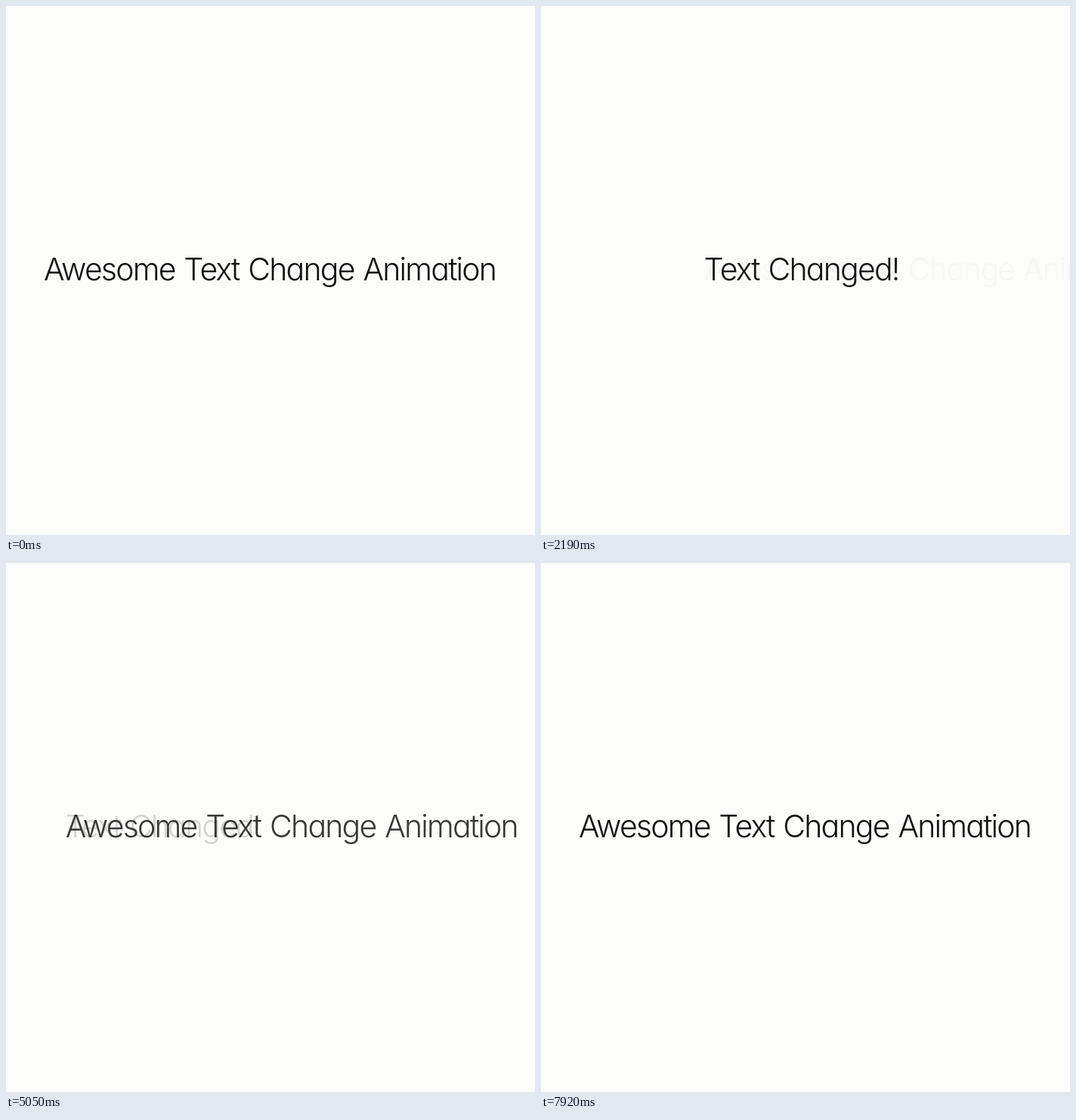
An HTML page that plays this animation: 700 by 700 pixels, repeating every 8 s.

```html
<!DOCTYPE html>
<html lang="en">
<head>
<meta charset="utf-8">
<title>Text change</title>
<style>
  html, body { margin: 0; width: 100%; height: 100%; overflow: hidden; background: #fcfcfb; }
  svg { display: block; width: 100%; height: 100%; }
  text {
    font: 300 41px Inter, Lato, sans-serif;
    font-optical-sizing: none;
    font-feature-settings: "cv11"; /* single-storey a */
    letter-spacing: -0.044em;
    word-spacing: 2px;
    fill: #111;
  }
</style>
</head>
<body>
<svg viewBox="0 0 700 700">
  <g id="line">
    <text id="short" y="363">Text Changed!</text>
    <text id="long" y="363">Awesome Text Change Animation</text>
  </g>
</svg>
<script>
  const LOOP = 8000, DURATION = 2000;
  const TO_SHORT = 555, TO_LONG = 3955;
  const LONG_X = 50, SHORT_X = 219;

  const [line, short, long] = ['line', 'short', 'long'].map(id => document.getElementById(id));

  // cubic-bezier(.4, 0, .2, 1), solved for its parameter by bisection
  function ease(x) {
    if (x <= 0) return 0;
    if (x >= 1) return 1;
    let low = 0, high = 1, s = 0.5;
    for (let i = 0; i < 24; i++) {
      const r = 1 - s;
      if (1.2 * r * r * s + 0.6 * r * s * s + s ** 3 < x) low = s;
      else high = s;
      s = (low + high) / 2;
    }
    return s * s * (3 - 2 * s);
  }

  function draw(now) {
    const t = now % LOOP;
    const progress = ease((t - TO_SHORT) / DURATION) - ease((t - TO_LONG) / DURATION);
    const x = LONG_X + (SHORT_X - LONG_X) * progress;
    line.setAttribute('transform', `translate(${x} 0)`);
    short.setAttribute('opacity', progress);
    long.setAttribute('opacity', 1 - progress);
  }

  const start = performance.now();
  function tick() {
    draw(performance.now() - start);
    requestAnimationFrame(tick);
  }
  tick();
</script>
</body>
</html>
```
